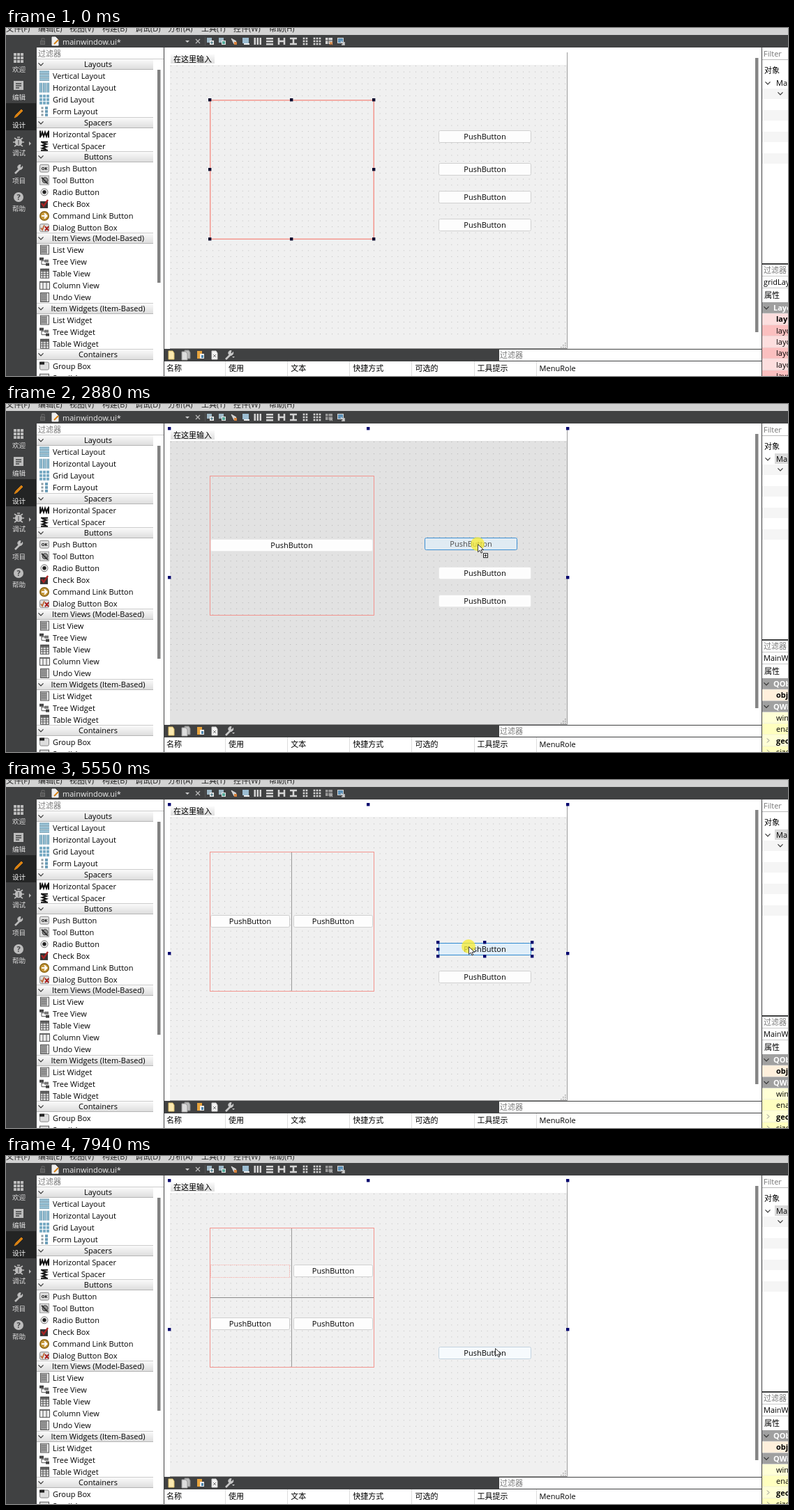
Recreate the animation shown at these times as an HTML page. Size 1121 px wide and 500 px high, loop 8 s.

```html
<!DOCTYPE html>
<html lang="zh-CN">
<head>
<meta charset="utf-8">
<style>
html, body { margin: 0; width: 100%; height: 100%; overflow: hidden; background: #fff; }
svg { display: block; width: 1121px; height: 500px; }
text { font: 11px "Open Sans", "Noto Sans CJK SC", "Noto Sans CJK", sans-serif; white-space: pre; }
</style>
</head>
<body>
<svg id="stage" viewBox="0 0 1121 500">
  <defs>
    <linearGradient id="head" x2="0" y2="1"><stop stop-color="#fafafa"/><stop offset="1" stop-color="#dedede"/></linearGradient>
    <linearGradient id="bar" x2="0" y2="1"><stop stop-color="#3f7894"/><stop offset=".5" stop-color="#b9dcec"/><stop offset="1" stop-color="#3f7894"/></linearGradient>
    <pattern id="dots" x="236" y="54" width="8.56" height="8.56" patternUnits="userSpaceOnUse"><rect width="1" height="1" fill="#bcbcbc"/></pattern>
  </defs>
  <g id="back"></g>
  <g id="props"></g>
  <g id="scene"></g>
</svg>
<script>
const $ = id => document.getElementById(id);
const rect = (x, y, w, h, fill, more = '') => `<rect x="${x}" y="${y}" width="${w}" height="${h}" fill="${fill}" ${more}/>`;
const frame = (x, y, w, h, stroke, fill = 'none', more = '') => rect(x + .5, y + .5, w - 1, h - 1, fill, `stroke="${stroke}" ${more}`);
const text = (x, y, s, fill = '#000', more = '') => `<text x="${x}" y="${y}" fill="${fill}" ${more}>${s}</text>`;
const path = (d, stroke, w = 1, fill = 'none') => `<path d="${d}" stroke="${stroke}" stroke-width="${w}" fill="${fill}"/>`;
const circle = (x, y, r, fill, more = '') => `<circle cx="${x}" cy="${y}" r="${r}" fill="${fill}" ${more}/>`;
const at = (x, y, s) => `<g transform="translate(${x} ${y})">${s}</g>`;
const mid = 'text-anchor="middle"', bold = 'style="font-weight:700"';
const range = n => [...Array(n).keys()];
const chevron = (x, y, c = '#333') => path(`M${x - 3.5} ${y - 1.7}l3.5 3.5 3.5-3.5`, c, 1.2);

// Icons are centred on 0,0
const cells = (n, m, s, step, c) => range(n * m).map(i =>
  rect((i % n - (n - 1) / 2) * step - s / 2, ((i / n | 0) - (m - 1) / 2) * step - s / 2, s, s, c)).join('');
const rows = c => range(3).map(i => rect(-7, i * 5 - 7, 14, 4, c)).join('');
const turn = s => `<g transform="rotate(90)">${s}</g>`;
const spring = path('M-6-5V5M6-5V5', '#111', 2) + path('M-5 3l2-6 2 6 2-6 2 6 2-6', '#111', 2);
const sheet = frame(-6, -7, 13, 14, '#555', '#e8e8e8');
const list = sheet + rect(-5, -6, 9, 12, '#9a9a9a') + path('M-4-3.5H3M-4-.5H3M-4 2.5H3', '#777');
const tree = rect(-7, -6, 6, 4, '#444') + rect(0, -3, 6, 4, '#777') + rect(2, 2, 5, 4, '#444') + path('M-4-2V4H2M-4-1H0', '#555');
const table = sheet + path('M-6-3H7M-6 0H7M-6 3H7M-2-7V7M2.5-7V7', '#555') + rect(-6, -7, 13, 3, '#555');
const column = frame(-7, -6, 15, 12, '#555', '#eee') + path('M-2-6V6M3-6V6', '#555') + rect(-7, -6, 15, 2, '#666');
const box = frame(-7, -6, 14, 12, '#888', '#ddd', 'rx="2"');
const check = path('M-4-1l3 4 6-9', '#a22', 2.4);
const wrench = c => path('M-5 6L2-1', c, 2.6) + path('M5.5-4.5A3.5 3.5 0 1 1 3-6.5L2-3l2 1z', c, 1, c);

const palette = [
  ['Layouts', 52, [['Vertical Layout', rows('url(#bar)')], ['Horizontal Layout', turn(rows('url(#bar)'))],
    ['Grid Layout', cells(3, 3, 4, 5, '#76a9c2')], ['Form Layout', at(3, 0, cells(1, 3, 4, 5, '#6a9db7')) + at(-3, 0, cells(1, 3, 3, 5, '#8b9ba3'))]]],
  ['Spacers', 136, [['Horizontal Spacer', spring], ['Vertical Spacer', turn(spring)]]],
  ['Buttons', 185, [['Push Button', box + `<text y="2.5" ${mid} style="font-size:6px;font-weight:700">OK</text>`],
    ['Tool Button', frame(-7, -7, 14, 14, '#999', '#ddd') + circle(1, 0, 4, '#999', 'stroke="#333"') + path('M-4-4L5 5', '#333', 2)],
    ['Radio Button', circle(0, 0, 5, '#eee', 'stroke="#777"') + circle(0, 0, 2.7, '#222')],
    ['Check Box', rect(-6, -4, 11, 10, '#333') + check],
    ['Command Link Button', circle(0, 0, 7, '#8a6413') + circle(0, 0, 5.5, '#c79a3c') + path('M-4 0H3M0-3.5L3.5 0 0 3.5', '#fff', 2)],
    ['Dialog Button Box', box + path('M-5 0l2 3 3-7', '#b63', 1.7) + path('M1-2l5 6M6-2L1 4', '#a11', 1.7)]]],
  ['Item Views (Model-Based)', 302, [['List View', list], ['Tree View', tree], ['Table View', table], ['Column View', column], ['Undo View', list]]],
  ['Item Widgets (Item-Based)', 403, [['List Widget', list], ['Tree Widget', tree], ['Table Widget', table]]],
  ['Containers', 469, [['Group Box', box + rect(-7, -6, 7, 4, '#222')], ['Scroll Area', frame(-7, -6, 14, 12, '#555', '#ddd')]]]
];

function sidebar() {
  const c = '#bcbcbc';
  const bug = circle(0, 1, 5.2, c) + path('M-6-5l3 2M6-5l-3 2M-8 1H8M-6 7l3-2M6 7L3 5M-2-6h4', c, 1.6) + path('M0-2V5', '#404142');
  const items = [['欢迎', cells(3, 3, 4, 5, c)],
    ['编辑', rect(-7, -7, 14, 13, c) + path('M-4-3H4M-4 0H4M-4 3H1', '#404142', 1.4)],
    ['设计', path('M-6 6l2-4L4-6l2 2L-2 4z', '#d98213', 1, '#d98213')],
    ['调试', bug], ['项目', wrench(c)],
    ['帮助', circle(0, 0, 7, c) + `<text y="4" ${mid} fill="#404142" style="font-weight:700">?</text>`]];
  return rect(0, 10, 44, 490, '#404142') + rect(0, 108, 43, 39, '#232424') + items.map(([s, icon], i) =>
    at(18, 43 + i * 40, icon) + `<text x="18.5" y="${63 + i * 40}" ${mid} fill="${i == 2 ? '#fff' : '#ddd'}" style="font-size:9.6px">${s}</text>`).join('')
    + path('M33 163l3 3-3 3z', 'none', 0, '#bbb');
}

function widgetBox() {
  let s = rect(44, 28, 182, 472, '#fff') + text(46, 40.5, '过滤器', '#777') + path('M44 44.5H226', '#ccc');
  for (const [name, y, items] of palette) {
    s += rect(44, y - 7, 167, 14, 'url(#head)') + path(`M44 ${y + 7.5}H211`, '#b5b5b5') + path(`M44 ${y - 7.5}H211`, '#ccc')
      + chevron(50, y) + text(132, y + 4, name, '#000', mid);
    items.forEach(([label, icon], i) => {
      const cy = y + 16.6 + i * 17.1;
      s += at(55, cy, icon) + text(67, cy + 4, label);
    });
  }
  return s + rect(217, 60, 4.5, 306, '#818181') + rect(226, 28, 1, 472, '#404142');
}

function toolbar() {
  const c = '#d4d4d4', pic = rect(-5, -5, 7, 7, '#9fb9c7') + rect(-1, -1, 6, 6, '#e8e8e8') + path('M0 2H4M2 0V4', '#367');
  const icons = [pic, pic + rect(0, 0, 4, 4, '#5a9'), path('M-4-4L3 0 0 4z', c, 1, c) + rect(0, 1, 4, 4, '#d8823c'),
    rect(-5, -5, 9, 8, '#9cbdd2') + path('M-3 4H5', '#eee', 2), turn(range(3).map(i => rect(-5, i * 4 - 5, 10, 2.5, c)).join('')),
    range(3).map(i => rect(-5, i * 4 - 5, 10, 2.5, c)).join(''), path('M-4-5V5M4-5V5M-3 0H3', c, 2.5), path('M-5-4H5M-5 4H5M0-3V3', c, 2.5),
    cells(2, 3, 2.6, 4, c), cells(3, 3, 2.6, 4, c), '', frame(-5, -5, 9, 8, c, '#5d91b8') + path('M0 0l5 5M5 1v4H1', c, 1.5)];
  return rect(0, 0, 1121, 10, '#d2d2d2')
    + ['文件(F)', '编辑(E)', '视图(V)', '构建(B)', '调试(D)', '分析(A)', '工具(T)', '控件(W)', '帮助(H)'].map((s, i) =>
      text([0, 46, 91, 138, 185, 232, 280, 326, 377][i], 5.3, s, '#222')).join('')
    + rect(0, 10, 1121, 18, '#404142') + frame(49, 18, 7, 6, '#6b6b6b', '#555') + path('M51 18v-3h4v2', '#6b6b6b')
    + path('M66 13h5l4 4v8H66z', '#eee', 1, '#eee') + path('M69 23l6-6', '#d98213', 2)
    + text(81, 23.5, 'mainwindow.ui*', '#eee') + path('M257 18h6l-3 3z', 'none', 0, '#ccc')
    + path('M272 16l6 6M278 16l-6 6', '#bbb', 1.2) + path('M285.5 13V25', '#555')
    + icons.map((icon, i) => at(293 + i * 17, 19, icon)).join('');
}

function actionEditor() {
  const doc = (a, b) => path('M-4-6H2L4-3V6H-4z', b, 1, a);
  return rect(226, 461, 858, 18, '#404142') + at(237, 470, doc('#fbe9b0', '#d9bd68'))
    + at(258, 470, at(2, -1, doc('#bbb', '#888')) + at(-2, 1, doc('#ddd', '#999')))
    + at(279, 470, rect(-5, -6, 7, 11, '#e8a33d') + rect(-1, -2, 6, 7, '#eee') + rect(1, 0, 3, 4, '#4d86b0'))
    + at(299, 470, doc('#f4f4f4', '#ccc') + path('M-2-1l4 4M2-1l-4 4', '#777'))
    + at(320, 470, wrench('#c8c8c8')) + path('M324 472h4l-2 2z', 'none', 0, '#ccc')
    + rect(707, 462, 376, 16, '#fff') + text(708, 474, '过滤器', '#777') + rect(227, 479, 856, 21, '#fff')
    + ['名称', '使用', '文本', '快捷方式', '可选的', '工具提示', 'MenuRole'].map((s, i) => {
      const x = 230 + i * 89.1;
      return text(x, 493, s) + (i ? path(`M${Math.round(x - 5) + .5} 479V500`, '#ddd') : '');
    }).join('');
}

function designer() {
  const grip = range(6).map(i => rect(801 - [0, 3, 0, 6, 3, 0][i], 458 - [6, 3, 3, 0, 0, 0][i], 1.6, 1.6, '#aaa')).join('');
  return rect(227, 28, 856, 433, '#fff') + rect(235, 53, 569, 407, '#f0f0f0') + rect(235, 53, 569, 393, 'url(#dots)') + grip
    + rect(236, 38, 63, 13, 'url(#head)') + text(240, 48.5, '在这里输入')
    + path('M804.5 35V460.5H235', '#9c9c9c') + rect(1074, 43, 4.5, 394, '#858585') + rect(1083, 28, 1, 472, '#404142');
}

function objectTree() {
  return rect(1084, 28, 37, 472, '#fff') + text(1086, 41, 'Filter', '#777') + path('M1084 45.5H1121', '#bbb')
    + text(1087, 65, '对象') + range(4).map(i => rect(1084, 87 + i * 31, 37, 15, '#f5f5f5')).join('')
    + chevron(1092, 79) + chevron(1110, 94) + rect(1084, 338, 37, 2, '#404142') + text(1086, 352, '过滤器', '#777')
    + path('M1084 356.5H1121M1084 373.5H1121', '#ccc') + text(1087, 388, '属性');
}

function properties(main) {
  // Row: label, background, bold, marker
  const layout = [['Layout', '#a0a0a0', 1, 'v'], ...range(6).map(i => ['layout', i % 2 ? '#fbbfbf' : '#fddede', !i, ''])];
  const win = [['QObject', '#a0a0a0', 1, 'v'], ['objectName', '#fff0dc', 1, ''], ['QWidget', '#a0a0a0', 1, 'v'],
    ['windowModality', '#ffffd6', 0, ''], ['enabled', '#ffffbf', 0, ''], ['geometry', '#ffffd6', 1, '>'], ['sizePolicy', '#ffffbf', 0, '>']];
  const faded = main ? '#999' : '#d4d4d4';
  return (main ? rect(1102, 71, 19, 15, '#d9d9d9') : '') + text(1104, 83, 'MainWindow')
    + text(1086, 369, main ? 'MainWindow' : 'gridLayout')
    + (main ? win : layout).map(([s, bg, b, mark], i) => {
      const y = 394 + i * 16.3, head = mark == 'v';
      return rect(1084, y, 37, 16.3, bg) + path(`M1084 ${y + 16}H1121`, '#ddd', .6)
        + (head ? chevron(1090, y + 8) : mark ? path(`M1091 ${y + 5}l3 3-3 3`, '#888') : '')
        + text(head ? 1100 : 1104, y + 12, s, head ? '#fff' : '#000', b ? bold : '');
    }).join('')
    + at(463, 19, rect(-5, -5, 10, 9, faded) + path('M-5-1H5M-1-5V4', '#404142') + path('M1 1l4 4M5 1L1 5', main ? '#aaa' : '#d8823c', 1.5));
}

const STEP = 1000 / 15, LOOP = 8000;

// Pointer track: step, x, y, 1 = eased arrival
const track = [[1, 1026, 487], [13, 674, 157, 1], [15, 674, 157], [16, 645, 160], [21, 520, 178], [27, 450, 176, 1],
  [28, 450, 176], [39, 696, 203, 1], [41, 696, 203], [47, 619, 196, 1], [51, 619, 196], [55, 580, 176],
  [63, 530, 169, 1], [71, 530, 169], [81, 663, 239, 1], [83, 663, 239], [91, 570, 62, 1], [95, 490, 86],
  [99, 462, 96], [106, 458, 106, 1], [112, 458, 106], [119, 701, 276, 1]];
function pointer(n) {
  const i = track.findIndex(k => k[0] > n);
  if (i < 0) return track[track.length - 1].slice(1, 3);
  const [n0, x0, y0] = track[i - 1], [n1, x1, y1, ease] = track[i];
  let p = (n - n0) / (n1 - n0);
  if (ease) p = p * p * (3 - 2 * p);
  return [x0 + (x1 - x0) * p, y0 + (y1 - y0) * p];
}

// Loose buttons: top, press, drag start, drop, grab offset
const never = Infinity;
const loose = [[147, 15, 16, 28, 54, 10], [194, 41, 42, 65, 76, 9], [234, 83, 84, 107, 45, 10], [274, never, never, never, 0, 0]];

function button(x, y, w, look = '') {
  const [edge, fill, ink] = { hot: ['#2f8ad0', '#e0eef9', '#000'], drag: ['#3d8fd2', 'rgba(224,237,246,.9)', '#4a4a4a'],
    warm: ['#c3d3df', '#f6fafd', '#000'], flat: ['#e9e9e9', '#fdfdfd', '#000'] }[look] || ['#d0d0d0', '#fdfdfd', '#000'];
  return frame(x, y, w, 18, edge, fill, 'rx="2"') + text(x + w / 2, y + 13, 'PushButton', ink, mid);
}
const handles = (xs, ys, c = '#00006e') => xs.flatMap((x, i) => ys.map((y, j) =>
  i == 1 && j == 1 ? '' : rect(x - 2, y - 2, 4.4, 4.4, c))).join('');

function grid(n, look) {
  const count = loose.filter(b => n >= b[3]).length;
  let s = frame(292, 103, 236, 201, '#f2948e');
  if (!count) s += frame(293, 104, 234, 199, '#f4c6bf');
  if (count > 1) s += path('M409.5 104V303', '#999');
  if (count > 2) s += path('M293 203.5H527', '#8a8a8a') + frame(293, 156, 114, 19, '#f7bdb8', 'none', 'stroke-dasharray="2 1"');
  if (count == 1) s += button(293, 194, 233, look);
  if (count == 2) s += button(293, 194, 114, look) + button(412, 194, 114, look);
  if (count == 3) s += button(412, 156, 114, look) + button(293, 232, 114, look) + button(412, 232, 114, look);
  return s;
}

function scene(n) {
  const [px, py] = n < 1 ? [-50, -50] : pointer(n);
  const held = loose.find(b => n >= b[1] && n < b[3]);
  const dragging = held && n >= held[2], look = dragging ? 'flat' : '';
  let s = dragging ? rect(235, 53, 569, 407, 'rgba(0,0,0,.06)') : '';
  s += grid(n, look);
  if (n < 15) s += handles([292, 409, 527], [103, 203, 303], '#0b0b2e');
  if (n >= 28) s += handles([234, 519, 805], [35, 249]);
  for (const b of loose) {
    if (n >= b[3] || (b == held && dragging)) continue;
    const over = px >= 620 && px < 753 && py >= b[0] && py < b[0] + 18;
    s += button(620, b[0], 133, !dragging && over ? (b[1] == never ? 'warm' : 'hot') : look);
    if (b == held) s += handles([619, 686, 754], [b[0] - 1, b[0] + 9, b[0] + 19]);
  }
  if (dragging) s += button(Math.round(px - held[4]), Math.round(py - held[5]), 133, 'drag');
  if (held) s += circle(px, py, 10, 'rgba(248,236,50,.75)');
  s += at(px, py, path('M.5.5V11.5L3.2 9 5 13 6.8 12.2 5 8.3H8.6z', '#222', .9, '#fff'));
  if (dragging) s += at(px + 8, py + 13, frame(0, 0, 7, 7, '#222', '#fff') + path('M1.5 3.5H5.5M3.5 1.5V5.5', '#222'));
  return s;
}

$('back').innerHTML = designer() + toolbar() + sidebar() + widgetBox() + actionEditor() + objectTree();
const panels = [properties(false), properties(true)];
let shownPanel = -1, shownStep = -1;
function draw(ms) {
  const n = Math.floor(ms % LOOP / STEP), panel = +(n >= 28);
  if (n == shownStep) return;
  shownStep = n;
  if (panel != shownPanel) $('props').innerHTML = panels[shownPanel = panel];
  $('scene').innerHTML = scene(n);
}
const start = performance.now();
function loop(now) {
  draw(Math.max(0, now - start));
  requestAnimationFrame(loop);
}
draw(0);
requestAnimationFrame(loop);
</script>
</body>
</html>
```
